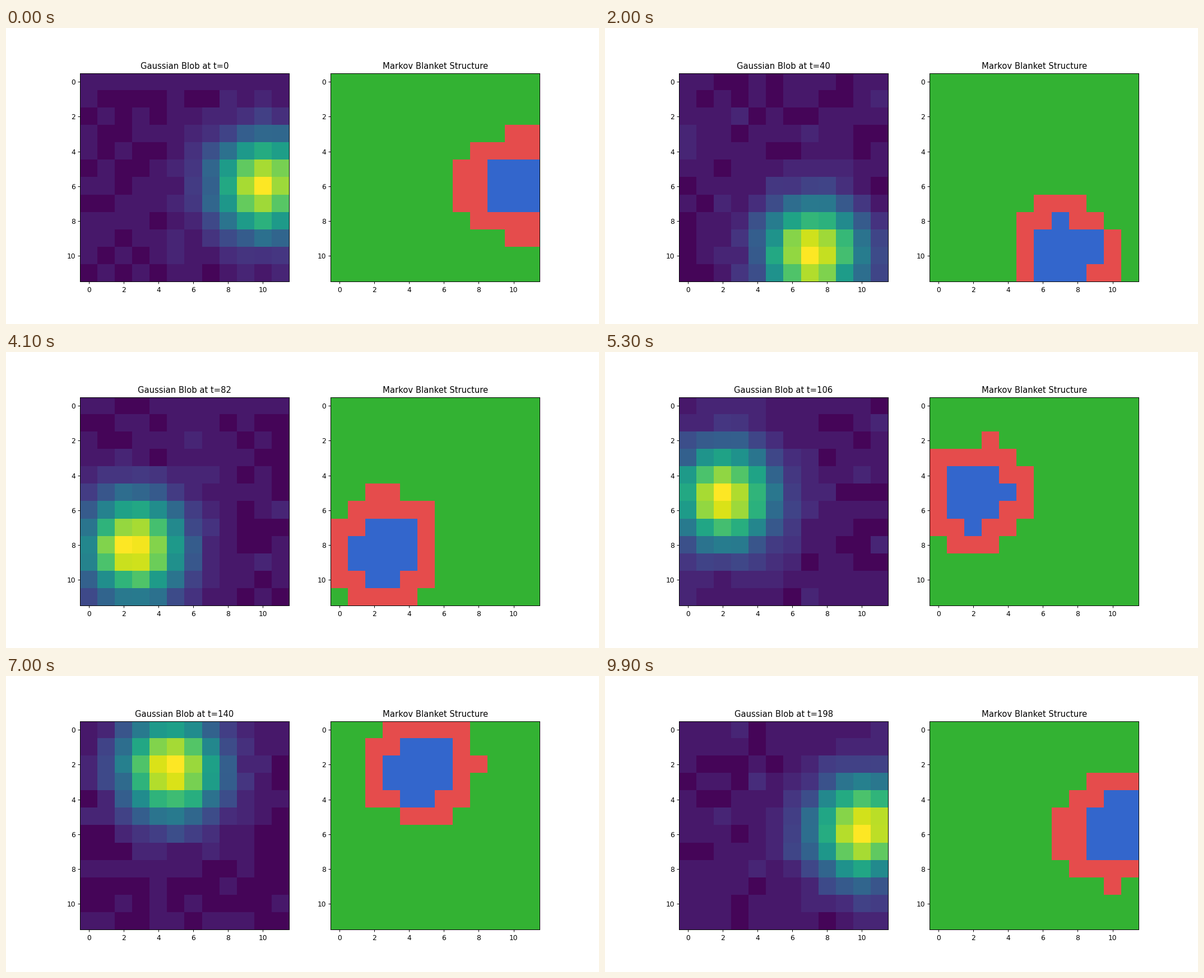
These frames come from a looping animation (1058x529 px, 10000 ms). A matplotlib script:

```python
import numpy as np
import matplotlib.pyplot as plt
from matplotlib.animation import FuncAnimation
from matplotlib.colors import ListedColormap

GRID, STEPS, STRIDE = 12, 200, 2
ORBIT, SIGMA, NOISE = 4, 2, 0.02
BLANKET, CORE = 0.3, 0.65

np.random.seed(42)
noise = NOISE * np.random.randn(STEPS, GRID, GRID)
ys, xs = np.mgrid[:GRID, :GRID]


def blob(t):
    """Noisy Gaussian circling the grid, scaled to 0..1."""
    a = 2 * np.pi * t / STEPS
    cx = GRID / 2 + ORBIT * np.cos(a)
    cy = GRID / 2 + ORBIT * np.sin(a)
    z = np.exp(-((xs - cx) ** 2 + (ys - cy) ** 2) / (2 * SIGMA ** 2)) + noise[t]
    return (z - z.min()) / (z.max() - z.min())


def regions(z):
    """0 outside, 1 blanket, 2 core."""
    return (z > BLANKET).astype(int) + (z > CORE)


# Viridis with its darkest end flattened into four tones
lut = plt.get_cmap("viridis")(np.arange(256))
for lo, hi, tone in [(0, 9, 3), (9, 11, 7), (11, 22, 16), (22, 32, 26)]:
    lut[lo:hi] = lut[tone].copy()
heat = ListedColormap(lut)
zones = ListedColormap([(0.2, 0.7, 0.2), (0.9, 0.3, 0.3), (0.2, 0.4, 0.8)])

plt.rcParams["font.family"] = "DejaVu Sans"
fig, (left, right) = plt.subplots(1, 2, figsize=(12, 6), dpi=1058 / 12 + 1e-9)
start = blob(0)
field = left.imshow(start, cmap=heat, vmin=0, vmax=1)
parts = right.imshow(regions(start), cmap=zones, vmin=0, vmax=2)
title = left.set_title("Gaussian Blob at t=0")
right.set_title("Markov Blanket Structure")


def update(i):
    t = i * STRIDE
    z = blob(t)
    field.set_data(z)
    parts.set_data(regions(z))
    title.set_text(f"Gaussian Blob at t={t}")
    return field, parts, title


anim = FuncAnimation(fig, update, frames=STEPS // STRIDE, interval=100,
                     repeat=True, repeat_delay=0, blit=False)
plt.show()
```
